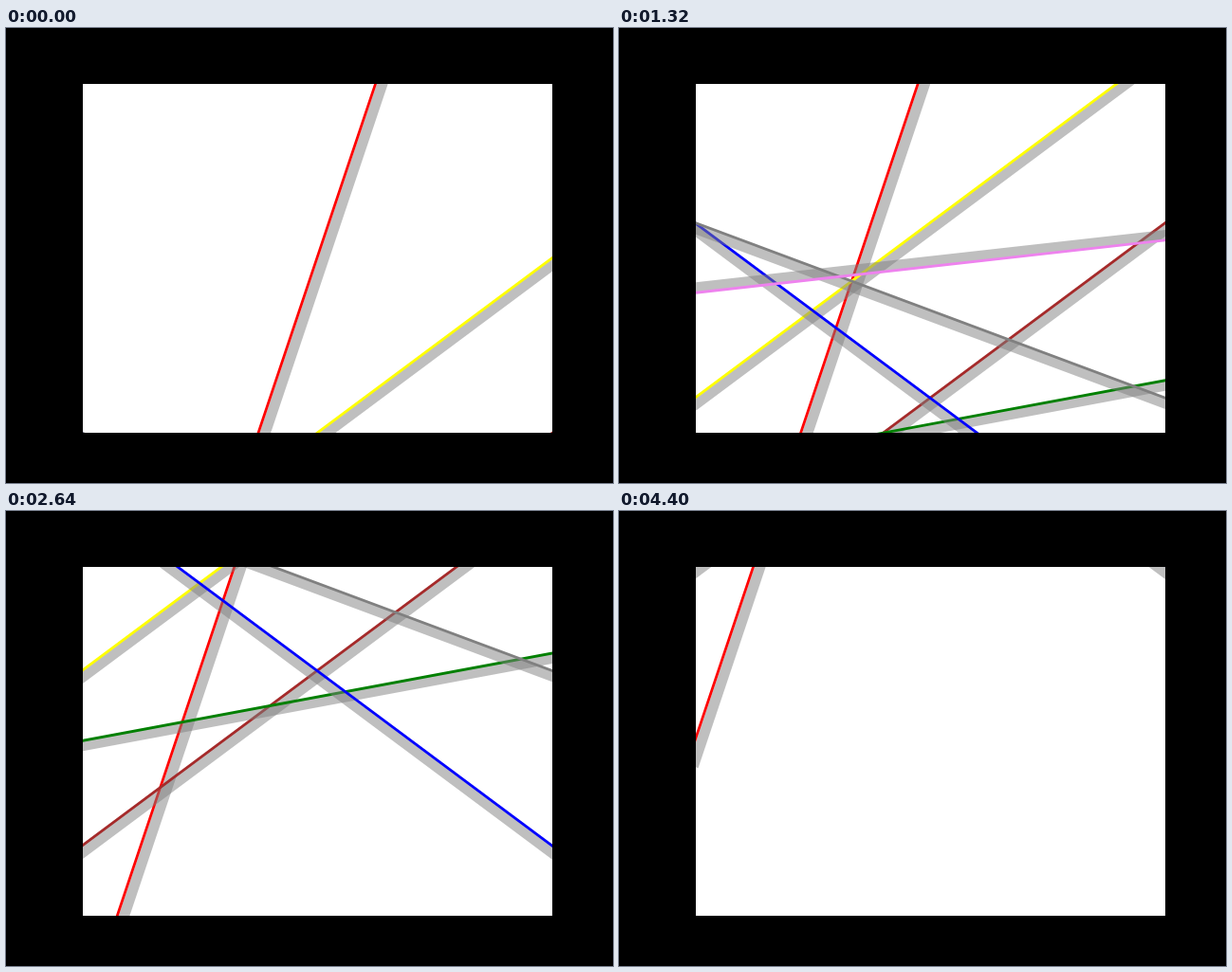
An HTML page with a canvas that plays this animation: 640x480 px, repeating every 4620 ms.

```html
<!DOCTYPE html>
<html lang="en">
<head>
<meta charset="utf-8">
<title>Moving constraint lines</title>
<style>
html, body { margin: 0; width: 100%; height: 100%; overflow: hidden; background: #000; }
canvas { display: block; }
</style>
</head>
<body>
<canvas id="stage" width="640" height="480"></canvas>
<script>
const ctx = document.getElementById('stage').getContext('2d');
const STEP = 220, STEPS = 21;
const SHADOW_GAP = 0.285;

// y = slope * x + start + speed * step, on axes from -10 to 10
const lines = [
  { color: 'red', slope: 4, start: 0, speed: 2 },
  { color: 'yellow', slope: 1, start: -10, speed: 2 },
  { color: 'brown', slope: 1, start: -20, speed: 2 },
  { color: 'green', slope: 0.25, start: -21.5, speed: 2 },
  { color: 'blue', slope: -1, start: -20, speed: 2 },
  { color: 'gray', slope: -0.5, start: -15, speed: 2 },
  { color: 'violet', slope: 0.15, start: 11.5, speed: -2 }
];

const px = x => 328 + x * 24.8;
const py = y => 242.4 - y * 18.48;

function stroke(slope, offset, width, color) {
  ctx.beginPath();
  for (const x of [-10, 10]) ctx.lineTo(px(x), py(slope * x + offset));
  ctx.lineWidth = width;
  ctx.strokeStyle = color;
  ctx.stroke();
}

function draw(step) {
  ctx.fillStyle = '#000';
  ctx.fillRect(0, 0, 640, 480);
  ctx.save();
  ctx.beginPath();
  ctx.rect(81, 59, 495, 368);
  ctx.clip();
  ctx.fillStyle = '#fff';
  ctx.fillRect(81, 59, 495, 368);
  ctx.lineCap = 'square';
  for (const { color, slope, start, speed } of lines) {
    const offset = start + speed * step;
    // the shadow trails behind the direction of travel
    const gap = Math.sign(speed) * SHADOW_GAP * Math.hypot(1, slope);
    stroke(slope, offset - gap, 11.11, 'rgba(128, 128, 128, 0.5)');
    stroke(slope, offset, 2.78, color);
  }
  ctx.restore();
}

const begin = performance.now();
function tick() {
  draw(Math.floor((performance.now() - begin) / STEP) % STEPS);
  requestAnimationFrame(tick);
}
tick();
</script>
</body>
</html>
```
